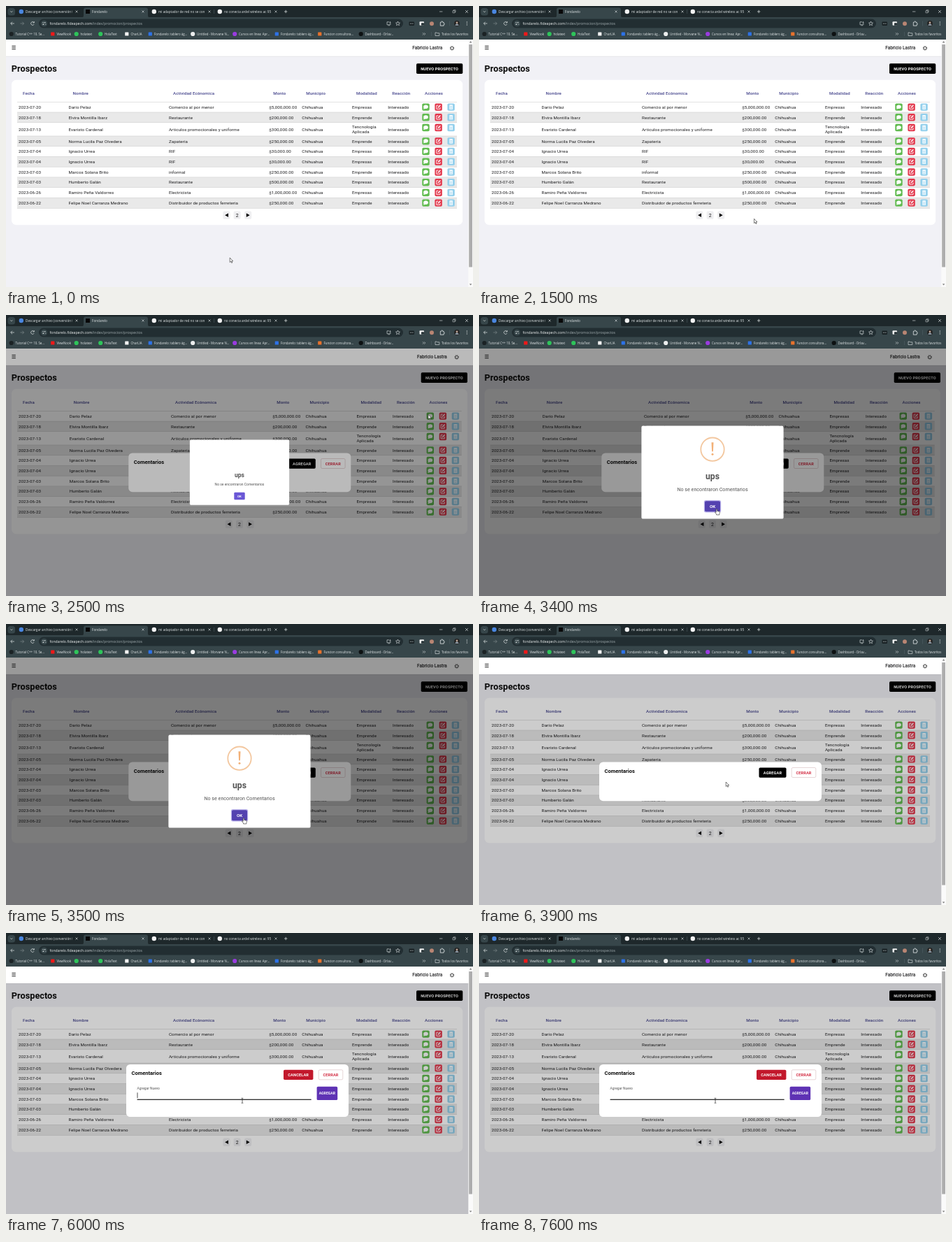
Animation of 668 by 402 pixels, one loop 8 s. Source, as an HTML page:

```html
<!DOCTYPE html>
<html lang="es">
<head>
<meta charset="utf-8">
<title>Prospectos</title>
<style>
html, body { margin: 0; width: 100%; height: 100%; overflow: hidden; background: #f1f1f6; }
svg { display: block; width: 668px; height: 402px; font-family: Roboto, sans-serif; }
.ui { font-family: "Open Sans", "Noto Sans", sans-serif; }
text { white-space: pre; }
</style>
</head>
<body>
<svg id="stage" viewBox="0 0 668 402" xmlns="http://www.w3.org/2000/svg"></svg>
<script>
const LOOP = 8000, STEP = 100;
const stage = document.getElementById('stage');

// ---------- markup helpers ----------
const rect = (x, y, w, h, fill, r = 0, extra = '') =>
  `<rect x="${x}" y="${y}" width="${w}" height="${h}" rx="${r}" fill="${fill}" ${extra}/>`;
const disc = (x, y, r, fill) => `<circle cx="${x}" cy="${y}" r="${r}" fill="${fill}"/>`;
const line = (d, stroke, w = 0.7, extra = '') =>
  `<path d="${d}" fill="none" stroke="${stroke}" stroke-width="${w}" ${extra}/>`;
const shape = (d, fill) => `<path d="${d}" fill="${fill}"/>`;
// y is the middle of the capitals
const text = (s, x, y, size, fill, extra = '') =>
  `<text x="${x}" y="${y + size * 0.355}" font-size="${size}" fill="${fill}" ${extra}>${s}</text>`;
const MID = 'text-anchor="middle"', BOLD = 'font-weight="700"';
const group = (id, body, extra = '') => `<g id="${id}" ${extra}>${body}</g>`;
const button = (s, x, y, w, h, fill, color, size = 5.65, extra = '') =>
  rect(x, y, w, h, fill, 1.7, extra) +
  text(s, x + w / 2, y + h / 2, size, color, `${MID} ${BOLD} letter-spacing=".02em"`);

// ---------- browser frame ----------
function browser() {
  const pale = '#e3e8e9', dim = '#7d898c';
  let s = rect(0, 0, 668, 16.5, '#1e282b') + rect(0, 16, 668, 32, '#37464a') +
    rect(2.5, 3, 10.5, 10.5, '#37464a', 3.5) + line('M6.3 7.4L7.8 8.9 9.3 7.4', pale) +
    shape('M108 16.5Q111 16.5 111 13.5V5.5Q111 2.5 114 2.5H200Q203 2.5 203 5.5V13.5Q203 16.5 206 16.5Z', '#37464a');
  const tabs = [
    [28, 'Descargar archivo (conversión f', '#4a86e0'],
    [123, 'Fondarelo', '#080808'],
    [218, 'mi adaptador de red no se con', '#f3f3f3'],
    [312, 'no conecta ardel wireless ac 950', '#f3f3f3']];
  tabs.forEach(([x, s1, c], i) => {
    s += i === 1 ? rect(x - 9, 5, 6, 6, c) : disc(x - 6.2, 8, 3.2, c);
    s += `<g clip-path="url(#tab${i})">${text(s1, x, 8, 4.65, pale)}</g>` +
      `<clipPath id="tab${i}"><rect x="${x}" y="0" width="67" height="16"/></clipPath>`;
    const k = 101 + i * 95;
    s += line(`M${k - 1.5} 6.5l3 3m0 -3l-3 3`, pale, 0.6);
  });
  s += line('M297.6 5V11', '#56656a', 0.5) + line('M398 8h4.4M400.2 5.8v4.4', pale) +
    line('M620 8h4.4', pale, 0.6) + line('M639 6.8h3v3h-3ZM640 6.8v-1h3v3h-1', pale, 0.5) +
    line('M657 6l4 4m0 -4l-4 4', pale, 0.6);

  s += line('M11.8 25H6.8m2.2 -2.3L6.7 25l2.3 2.3', pale) +
    line('M20.5 25h5m-2.2 -2.3l2.3 2.3 -2.3 2.3', dim) +
    line('M40 23.6A2.4 2.4 0 1 0 40.2 26M40.3 22v2h-2', pale) +
    rect(47, 18.5, 521, 13, '#222e32', 6.5) + disc(54.5, 25, 4.6, '#37464a') +
    line('M52 23.7h2.5M56 26.3h1.3M52 26.3h1.3', pale, 0.6) +
    disc(55.8, 23.7, 0.8, pale) + disc(53.7, 26.3, 0.8, pale) +
    `<text x="62.5" y="26.8" font-size="5.2" fill="#f0f3f3">fondarelo.fideapech.com<tspan fill="#a2adb0">/index/promocion/prospectos</tspan></text>` +
    line('M548 22.8h-3v4h5v-1.5M546.5 27.8h2.5M549.5 22v2.6m-1.2 -1l1.2 1.2 1.2 -1.2', pale, 0.6) +
    line('M560.5 22l.9 2 2.1.2 -1.6 1.4.5 2.1 -1.9 -1.1 -1.9 1.1.5 -2.1 -1.6 -1.4 2.1 -.2Z', pale, 0.6) +
    rect(576.5, 22.5, 7.5, 5.5, '#182023', 1) + line('M578 25.2h4.6', '#cfd5d6', 0.9, 'stroke-dasharray="1 .8"') +
    rect(591.5, 22.3, 6.5, 5.5, '#f1f1f1', 1) + rect(594, 24.2, 4, 3.6, '#263236', 0.6) +
    disc(609, 25.2, 3, '#b98573') +
    line('M621.3 23.3h1.4q0 -1.4 1 -1.4t1 1.4h1.4v1.4q1.2 0 1.2 1t-1.2 1v1.5h-4.8Z', pale, 0.8) +
    line('M634.5 21.5v7', '#56656a', 0.5) +
    disc(645, 25, 3.9, '#232323') + disc(645, 24, 1.4, '#bfa595') + shape('M642.5 28q0 -2.4 2.5 -2.4t2.5 2.4Z', '#8d9aa6') +
    disc(659.3, 22.9, 0.6, pale) + disc(659.3, 25, 0.6, pale) + disc(659.3, 27.1, 0.6, pale);

  const marks = [
    [13.5, 'Tutorial C++ 10. Se...', '#1b2224', 0], [72.5, 'ViewNook', '#f01818', 1],
    [106.5, 'holatext', '#2ec45a', 0], [141, 'HolaText', '#2ec45a', 0],
    [178.5, 'CharLIA', '#f2f2f2', 1], [212, 'Fondarelo: tablero ág...', '#2d72e8', 1],
    [273, 'Untitled - Morvane N...', '#eceeee', 0], [333, 'Cursos en línea: Apr...', '#9a3be0', 0],
    [393, 'Fondarelo: tablero ág...', '#2d72e8', 1], [454.5, 'Funcion consultora...', '#e8722c', 1],
    [513.5, 'Dashboard - Orlav...', '#0d1112', 0]];
  for (const [x, s1, c, square] of marks)
    s += (square ? rect(x - 8.3, 37.4, 5.2, 5.2, c, 0.6) : disc(x - 5.8, 40, 3.1, c)) + text(s1, x, 40, 4.4, pale);
  s += line('M596 38.4l1.6 1.6 -1.6 1.6M598.2 38.4l1.6 1.6 -1.6 1.6', pale, 0.6) +
    line('M608.5 37v6', '#56656a', 0.5) + line('M614 38h2l.8 .8h3v3.7h-5.8Z', pale, 0.6) +
    text('Todos los favoritos', 623, 40, 4.4, pale);
  return s;
}

// ---------- page ----------
const COLS = [ // heading, x, shift when the scrollbar is hidden
  ['Fecha', 18, 0], ['Nombre', 89.5, 1.3], ['Actividad Ecónomica', 233, 3], ['Monto', 376.3, 5],
  ['Municipio', 423.3, 5.3], ['Modalidad', 495, 6.4], ['Reacción', 546.3, 6.6], ['Acciones', 593, 6.6]];
const ROWS = [
  ['07-20', 'Darío Pelaz', 'Comercio al por menor', '5,000,000', 'Empresas'],
  ['07-18', 'Elvira Montilla Ibarz', 'Restaurante', '200,000', 'Emprende'],
  ['07-13', 'Evaristo Cardenal', 'Articulos promocionales y uniforme', '300,000', 'Tencnología|Aplicada'],
  ['07-05', 'Norma Lucila Paz Olvedera', 'Zapateria', '250,000', 'Emprende'],
  ['07-04', 'Ignacio Urrea', 'RIF', '30,000', 'Empresas'],
  ['07-04', 'Ignacio Urrea', 'RIF', '30,000', 'Empresas'],
  ['07-03', 'Marcos Solana Brito', 'informal', '250,000', 'Emprende'],
  ['07-03', 'Humberto Galán', 'Restaurante', '500,000', 'Empresas'],
  ['06-26', 'Ramiro Peña Valdorres', 'Electricista', '1,000,000', 'Empresas'],
  ['06-22', 'Felipe Noel Carranza Medrano', 'Distribuidor de productos ferreteria', '250,000', 'Emprende']];
const rowH = i => i === 2 ? 19.3 : 14.72;
const rowY = i => 137.3 + i * 14.72 + (i > 2 ? 4.58 : 0);

function actions(x, y) {
  return rect(x - 5.2, y - 5.2, 10.4, 10.4, '#61bb50', 1.8) +
    `<ellipse cx="${x}" cy="${y - 0.4}" rx="3.3" ry="2.7" fill="#fff"/>` +
    shape(`M${x - 2.8} ${y + 0.6}l-.5 2.6 2.8 -1Z`, '#fff') +
    rect(x + 12.9, y - 5.2, 10.4, 10.4, '#e2364b', 1.8) +
    line(`M${x + 18} ${y - 2.4}h-2.7v5.2h5.2v-2.6`, '#fff', 0.9) +
    line(`M${x + 17.3} ${y + 0.9}l3.6 -3.7`, '#fff', 1.4) +
    rect(x + 30.9, y - 5.2, 10.4, 10.4, '#94d0ec', 1.8) +
    rect(x + 33.8, y - 3.3, 4.7, 6.6, '#f4fbff', 0.6) +
    line(`M${x + 34.7} ${y - 1}h2.9m-2.9 1.5h2.9m-2.9 1.5h2.9`, '#94d0ec', 0.6);
}

function page(wide) {
  const d = wide ? 6.7 : 0, ink = '#1d1d1f';
  let s = rect(0, 48, 668, 354, '#f1f1f6') + rect(0, 48, 668, 24, '#fff') + rect(0, 71.8, 668, 0.6, '#d9d9de') +
    line('M8.4 57.4h5.4m-5.4 2.1h5.4m-5.4 2.1h5.4', '#555', 1.2) +
    text('Fabricio Lastra', 581.3 + d, 60.2, 6.45, ink, 'font-weight="500"') +
    `<circle cx="${638 + d}" cy="60.3" r="2.5" fill="none" stroke="#555" stroke-width="1.3" stroke-dasharray="1.3 .66"/>` +
    `<circle cx="${638 + d}" cy="60.3" r="1.8" fill="none" stroke="#555" stroke-width=".7"/>` +
    text('Prospectos', 7.8, 89.6, 12.75, '#0c0c0c', BOLD) +
    button('NUEVO PROSPECTO', 587 + d, 82.3, 66.3, 14.6, '#000', '#fff') +
    rect(8, 105.8, 645.2 + d, 207.4, '#fff', 6.5);
  for (const [h, x, dx] of COLS)
    s += text(h, x + 6 + (wide ? dx : 0), 125.2, 6.15, '#45458c', 'font-weight="500" letter-spacing=".0107em"');
  ROWS.forEach((r, i) => {
    if (i % 2) s += rect(16, rowY(i), 629 + d, rowH(i), '#e9e9e9');
  });
  if (!wide) s += rect(16, 0, 629, 14, '#e8e8f4', 0, 'id="hover"');
  ROWS.forEach(([date, name, job, sum, kind], i) => {
    const y = rowY(i), m = y + rowH(i) / 2;
    s += rect(16, y - 0.3, 629 + d, 0.6, '#cfcfcf');
    ['2023-' + date, name, job, `$${sum}.00`, 'Chihuahua', kind, 'Interesado'].forEach((v, c) => {
      const x = COLS[c][1] + (wide ? COLS[c][2] : 0), lines = v.split('|');
      lines.forEach((l, k) => {
        s += text(l, x, m + (k - (lines.length - 1) / 2) * 7.6, 6.22, ink, 'letter-spacing=".0107em"');
      });
    });
    s += actions(600.5 + (wide ? 6.3 : 0), y + 7.3);
  });
  s += rect(16, 289.2, 629 + d, 0.6, '#cfcfcf');
  const c = 330.6 + d / 2;
  for (const k of [-15.2, 0, 15.6]) s += rect(c + k - 5, 293.6, 10, 11.4, '#efeff1', 2);
  s += shape(`M${c - 17.4} 299.2l4.8 -2.7v5.4Z`, '#000') + shape(`M${c + 18} 299.2l-4.8 -2.7v5.4Z`, '#000') +
    text('2', c, 299.3, 6.9, ink, MID);
  if (!wide)
    s += rect(661.3, 48, 6.7, 354, '#fafafa') + rect(662.2, 55, 4.8, 318.5, '#adadad') +
      shape('M662.8 52.4h3.6l-1.8 -2.2Z', '#777') + shape('M662.8 397.4h3.6l-1.8 2.2Z', '#777');
  return s;
}

// ---------- dialogs ----------
const closeBtn = y => button('CERRAR', 447.2, y, 34.6, 14, '#fff', '#d32f45', 5.65, 'stroke="#d5b9bd" stroke-width=".6"');
const heading = y => text('Comentarios', 179.5, y, 7.5, '#0c0c0c', BOLD);

function panels() {
  return group('small',
    rect(172, 197.4, 318, 55.8, '#fff', 5.5) + heading(210.2) +
    button('AGREGAR', 400.5, 205.5, 39, 14.2, '#000', '#fff') + closeBtn(205.5)) +
  group('form',
    rect(172, 188, 318, 75, '#fff', 5.5) + heading(200.7) +
    button('CANCELAR', 397, 195.8, 42.4, 14.2, '#c2182c', '#fff') + closeBtn(195.8) +
    `<text id="label" x="187.6" fill="#555">Agregar Nuevo</text>` +
    rect(187.6, 238, 249, 0.5, '#8a8a8a') + rect(187.6, 237.7, 249, 1.1, '#111', 0, 'id="under"') +
    rect(187.6, 228.3, 0.8, 7.9, '#222', 0, 'id="caret"') +
    button('AGREGAR', 444.6, 219.7, 29.6, 19.4, '#5e32b4', '#fff', 5));
}

function alertBox() {
  return rect(232.4, 158.6, 203.2, 133, '#fff', 2.2) +
    group('sign',
      '<circle cx="334" cy="192.2" r="16.7" fill="none" stroke="#f3c79f" stroke-width="1.8"/>' +
      group('mark', shape('M332.5 182.3h3l-.6 13h-1.8Z', '#f2b077') + disc(334, 199.2, 1.5, '#f2b077'))) +
    text('ups', 334, 230.6, 12.2, '#545454', `${MID} ${BOLD}`) +
    text('No se encontraron Comentarios', 334, 249.6, 7.15, '#545454', MID) +
    rect(321.8, 265, 24.4, 17.4, '#b9b2ea', 2.6, 'id="ring"') +
    rect(323, 266.2, 22, 15, '#6a57d6', 1.8, 'id="ok"') +
    text('OK', 334, 273.8, 6.2, '#fff', `${MID} ${BOLD}`);
}

const cursors =
  group('arrow', '<path d="M0 0V6.4L1.5 5 2.5 7.3 3.5 6.9 2.5 4.7H4.5Z" fill="#fff" stroke="#111" stroke-width=".55"/>') +
  group('hand', '<path d="M-.8 .7Q0 -.4 .8 .7V3.2L3.6 3.8Q4.5 4 4.4 5L3.9 7.4V8.6H-.4V7.6L-2.5 4.9Q-2.2 3.9 -.8 5Z" fill="#fff" stroke="#111" stroke-width=".55"/>') +
  group('beam', line('M-1.3 -3.5H-.4L0 -3.1.4 -3.5H1.3M0 -3.1V3.1M-1.3 3.5H-.4L0 3.1.4 3.5H1.3', '#111', 0.65));

stage.innerHTML = group('narrow', page(false)) + group('wide', page(true)) +
  rect(0, 72, 661.3, 330, '#000', 0, 'id="shade" opacity=".2"') +
  group('panel', panels()) + rect(0, 48, 668, 354, '#000', 0, 'id="veil"') +
  group('alert', alertBox()) + group('chrome', browser(), 'class="ui"') + group('mouse', cursors);

// ---------- motion ----------
const el = {};
stage.querySelectorAll('[id]').forEach(n => el[n.id] = n);
const show = (id, on) => { el[id].style.display = on ? '' : 'none'; };
const set = (id, name, v) => el[id].setAttribute(name, v);
const clamp = v => Math.max(0, Math.min(1, v));
const ease = p => p * p * (3 - 2 * p);

// keys: [time, value...]
function tween(keys, t, curve = p => p) {
  let i = 0;
  while (i < keys.length - 2 && t >= keys[i + 1][0]) i++;
  const a = keys[i], b = keys[i + 1], p = curve(clamp((t - a[0]) / (b[0] - a[0])));
  return a.slice(1).map((v, k) => v + (b[k + 1] - v) * p);
}

const PATH = [
  [1200, 320.2, 360.2], [2100, 603, 145], [2300, 606.3, 142.6], [2500, 604, 142.6], [2700, 602, 144],
  [3300, 340, 277.3], [3500, 340, 277.3], [3900, 353.2, 226], [4300, 419, 212], [4700, 419, 206],
  [4800, 414, 204], [5100, 338, 239.8]];
const POP = [[0, 0.7], [135, 1.05], [240, 0.95], [300, 1]];
const SHAKE = [[0, 45], [125, -25], [250, 15], [375, -5], [500, 0]];

function draw(now) {
  const t = Math.floor(now / STEP) * STEP;
  const popped = t >= 2500 && t < 3700, wide = popped, open = t >= 2400, form = t >= 4500;
  const [x, y] = tween(PATH, t, ease);

  show('narrow', !wide);
  show('wide', wide);
  const row = ROWS.findIndex((r, i) => y >= rowY(i) && y < rowY(i) + rowH(i));
  const hovered = !open && row >= 0;
  show('hover', hovered);
  if (hovered) { set('hover', 'y', rowY(row)); set('hover', 'height', rowH(row)); }

  show('shade', open);
  set('shade', 'width', wide ? 668 : 661.3);
  show('panel', open);
  set('panel', 'transform', `translate(${wide ? 3.3 : 0} 0)`);
  show('small', !form);
  show('form', form);

  const gone = clamp((t - 3500) / 150);
  show('veil', popped);
  set('veil', 'opacity', t < 2600 ? 0.27 : 0.4 * (1 - clamp((t - 3500) / 100)));
  show('alert', popped);
  if (popped) {
    const k = gone ? 1 - gone / 2 : tween(POP, t - 2500)[0];
    set('alert', 'transform', `translate(334 225.1) scale(${k}) translate(-334 -225.1)`);
    set('alert', 'opacity', 1 - gone);
    const p = clamp((t - 2500) / 500);
    set('sign', 'opacity', p);
    set('sign', 'transform', `translate(0 192.2) scale(1 ${Math.cos((1 - p) * 100 * Math.PI / 180)}) translate(0 -192.2)`);
    set('mark', 'transform', `rotate(${tween(SHAKE, t - 2500)[0]} 334 192.2)`);
    show('ring', t >= 2800);
    set('ok', 'fill', t >= 3200 ? '#5442b0' : '#6a57d6');
  }

  const focus = ease(clamp((t - 4900) / 200));
  set('label', 'y', 235.2 - focus * 11.2);
  set('label', 'font-size', 6.5 - focus * 1.6);
  set('under', 'transform', `translate(312.1 0) scale(${focus} 1) translate(-312.1 0)`);
  show('caret', (t >= 5000 && t < 5500) || (t >= 6000 && t < 6500) || (t >= 7000 && t < 7600));

  const beam = t >= 5000;
  const hand = (t >= 2100 && t < 2500) || (t >= 3200 && t < 3700) || (t >= 4200 && t < 4900);
  show('beam', beam);
  show('hand', hand);
  show('arrow', !beam && !hand);
  set('mouse', 'transform', `translate(${x} ${y})`);
}

const start = performance.now();
function tick() {
  draw((performance.now() - start) % LOOP);
  requestAnimationFrame(tick);
}
tick();
</script>
</body>
</html>
```
